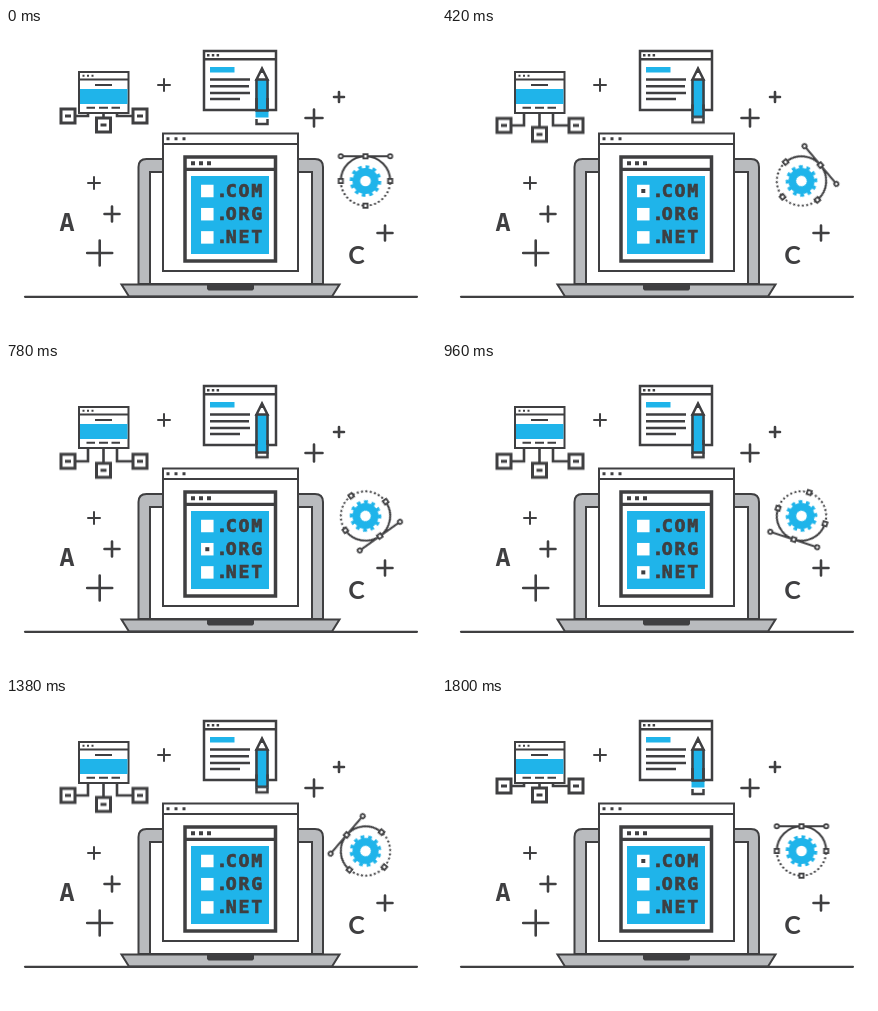
Recreate the animation shown at these times as an HTML page. Size 430 by 307 pixels, loop 1830 ms.

```html
<!DOCTYPE html>
<html lang="en">
<head>
<meta charset="utf-8">
<title>Domain names</title>
<style>
  html, body { margin: 0; width: 100%; height: 100%; overflow: hidden; background: #fff; }
  svg { display: block; width: 430px; height: 307px; }
  .line { fill: none; stroke: #3f3f41; }
  .box { fill: #fff; stroke: #3f3f41; }
  .dark { fill: #3f3f41; }
  .blue { fill: #1fb4ea; }
  .white { fill: #fff; }
  .domain { font: bold 18.2px "DejaVu Sans Mono", monospace; letter-spacing: 1.7px; fill: #3f3f41; stroke: #3f3f41; stroke-width: .7; }
  .letter { fill: #3f3f41; text-anchor: middle; }
</style>
</head>
<body>
<svg viewBox="0 0 430 307">
  <g id="pluses" class="line"></g>
  <text class="letter" x="61" y="203" style="font: 600 25px 'Noto Sans Mono', monospace">A</text>
  <text class="letter" x="350.5" y="236" style="font: bold 25px Lato, sans-serif">C</text>

  <!-- site map -->
  <g id="nodes">
    <path class="line" stroke-width="2.6" d="M70 88H82V74M126 88H111V74M97.5 89V74"/>
  </g>
  <rect class="box" stroke-width="2" x="73" y="44" width="49.5" height="41"/>
  <path class="line" stroke-width="2" d="M73 51.5H122M89 57H106M80.5 79.7H89M93 79.7H102M105.5 79.7H114"/>
  <path class="line" stroke-width="2" stroke-dasharray="2 2.5" d="M76.5 47.8H88"/>
  <rect class="blue" x="74" y="61" width="47.5" height="15"/>

  <!-- document and pencil -->
  <rect class="box" stroke-width="2.5" x="198" y="23" width="72" height="59"/>
  <path class="line" stroke-width="2.5" d="M198 31.3H270M204 51.5H244M204 58.2H243M204 65H244M204 71H234"/>
  <path class="line" stroke-width="2.5" stroke-dasharray="2.5 2.3" d="M201 27.2H213.2"/>
  <rect class="blue" x="204" y="39" width="24.5" height="5.5"/>
  <g id="cap">
    <path class="box" stroke-width="2.5" d="M250.5 91V96H261.5V91"/>
  </g>
  <rect class="blue" x="249.5" y="51" width="13" height="38.5"/>
  <path id="sleeve" class="line" stroke-width="2.5" d="M250.5 70V82.5H261.5V70"/>
  <path class="box" stroke-width="2.5" d="M250.5 51.5L256 40.5L261.5 51.5Z"/>
  <path class="dark" d="M253.4 45L256 39L258.6 45Z"/>
  <path class="line" stroke-width="2.5" d="M250.5 51V82M261.5 51V82"/>

  <!-- curve editor -->
  <g transform="translate(359.5 153)">
    <g id="dial">
      <path class="line" stroke-width="2" d="M-24.7 0A24.7 24.7 0 0 1 24.7 0M-24.7 -24.7H24.7"/>
      <path class="line" stroke-width="2" stroke-dasharray="2 2.3" d="M-24.7 0A24.7 24.7 0 0 0 24.7 0"/>
      <g id="handles" class="box" stroke-width="1.8"></g>
      <circle class="blue" r="13"/>
      <circle r="13.9" fill="none" stroke="#1fb4ea" stroke-width="3.8" pathLength="24" stroke-dasharray="1 1"/>
      <circle class="white" r="5.3"/>
    </g>
  </g>

  <!-- laptop -->
  <path d="M132.5 256V139Q132.5 131 140.5 131H309Q317 131 317 139V256Z" fill="#b9bbbe" stroke="#3f3f41" stroke-width="2"/>
  <rect class="box" stroke-width="2" x="144" y="144" width="162" height="112"/>
  <path d="M115.5 256.5H333.5L326 268.5H123Z" fill="#b9bbbe" stroke="#3f3f41" stroke-width="2"/>
  <path class="dark" d="M201 256H248V261L246.5 262.5H202.5L201 261Z"/>
  <path class="line" stroke-width="2.2" stroke-linecap="round" d="M19 268.8H411"/>

  <!-- windows on the screen -->
  <rect class="box" stroke-width="2" x="157" y="105.5" width="135" height="137.5"/>
  <path class="line" stroke-width="2" d="M157 116H292"/>
  <path class="line" stroke-width="3" stroke-dasharray="3 5" d="M160.5 110.8H180"/>
  <rect class="box" stroke-width="3.5" x="179" y="129" width="90.5" height="104"/>
  <path class="line" stroke-width="3.2" d="M179 141.3H269"/>
  <path class="line" stroke-width="4" stroke-dasharray="4 4" d="M185 135.3H205.5"/>
  <rect class="blue" x="185" y="148" width="78" height="78"/>
  <g id="rows"></g>
</svg>

<script>
  const LOOP = 1830, END = 1800 / LOOP;
  const byId = id => document.getElementById(id);

  function add(parent, tag, attrs, text = "") {
    const node = document.createElementNS("http://www.w3.org/2000/svg", tag);
    for (const key in attrs) node.setAttribute(key, attrs[key]);
    node.textContent = text;
    parent.append(node);
    return node;
  }

  const square = (parent, x, y, size, attrs) =>
    add(parent, "rect", { x: x - size / 2, y: y - size / 2, width: size, height: size, ...attrs });

  const play = (node, frames) => node.animate(frames, { duration: LOOP, iterations: Infinity });

  // x, y, size, line weight
  [[158, 57, 12, 2], [333, 69, 10, 2.6], [308, 90, 17, 2.6], [88, 155, 12, 2],
   [106, 186, 15, 2.6], [93.7, 225, 25, 2.6], [379, 205, 15, 2.6]].forEach(([x, y, s, w]) =>
    add(byId("pluses"), "path", {
      d: `M${x - s / 2} ${y}h${s}M${x} ${y - s / 2}v${s}`, "stroke-width": w, "stroke-linecap": "round"
    }));

  [[62, 88], [97.5, 97], [134, 88]].forEach(([x, y]) => {
    square(byId("nodes"), x, y, 14, { class: "box", "stroke-width": 3 });
    add(byId("nodes"), "path", { class: "line", "stroke-width": 3, d: `M${x - 3} ${y}h6` });
  });

  const R = 24.7;
  [[-R, 0], [R, 0], [0, -R], [0, R]].forEach(([x, y]) => square(byId("handles"), x, y, 4.2));
  [-R, R].forEach(x => add(byId("handles"), "circle", { cx: x, cy: -R, r: 2.1 }));

  // domain rows; each mark is lit in some sixths of the loop
  [[".COM", [1, 5]], [".ORG", [2]], [".NET", [3]]].forEach(([name, lit], i) => {
    const y = 163 + i * 23.2, rows = byId("rows");
    square(rows, 201.3, y, 12.5, { class: "white" });
    const mark = square(rows, 201.3, y, 4, { class: "dark" });
    add(rows, "text", { class: "domain", x: 210.5, y: y + 6, dx: "0 -3.3" }, name);
    play(mark, [0, 1, 2, 3, 4, 5, 5].map(k => ({ opacity: lit.includes(k) ? 1 : 0, easing: "step-end" })));
  });

  play(byId("dial"), [
    { transform: "rotate(0deg)", offset: 0, easing: "cubic-bezier(.333,0,.667,1)" },
    { transform: "rotate(360deg)", offset: END },
    { transform: "rotate(360deg)", offset: 1 }
  ]);

  // out, hold, and back again
  function slide(id, dy) {
    const at = (y, ms, easing = "linear") => ({ transform: `translateY(${y}px)`, offset: ms / LOOP, easing });
    play(byId(id), [
      at(0, 0, "cubic-bezier(.33,0,.35,1)"), at(dy, 600),
      at(dy, 1200, "cubic-bezier(.65,0,.67,1)"), at(0, 1800), at(0, LOOP)
    ]);
  }
  slide("nodes", 10.3);
  slide("sleeve", 7);
  slide("cap", -1.8);
</script>
</body>
</html>
```
